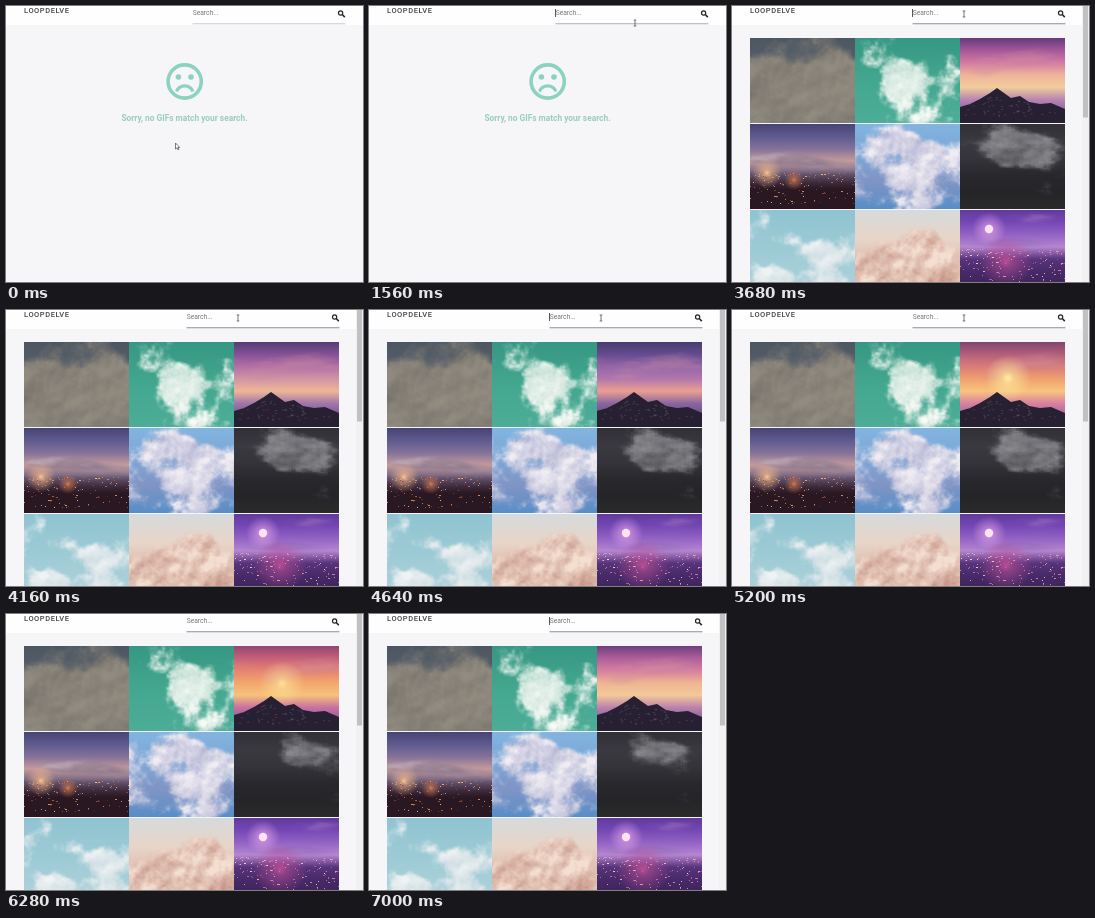
These frames come from a looping animation (357x276 px, 7040 ms). An HTML page with a canvas:

```html
<!DOCTYPE html>
<html lang="en">
<head>
<meta charset="utf-8">
<title>Clip search</title>
<style>
  html, body { margin: 0; width: 100%; height: 100%; overflow: hidden; background: #f6f5f8; }
  canvas, svg { position: absolute; left: 0; top: 0; width: 357px; height: 276px; }
  text { font-family: Roboto, sans-serif; white-space: pre; }
</style>
</head>
<body>
<canvas id="grid" width="357" height="276"></canvas>
<svg viewBox="0 0 357 276">
  <rect width="357" height="19" fill="#fefefe"/>
  <text x="18" y="6.8" font-size="7.5" font-weight="500" letter-spacing=".55" fill="#444">LOOPDELVE</text>
  <g id="bar">
    <text id="query" x="186.7" y="9" font-size="6.7"></text>
    <rect id="caret" x="186" y="3" width=".9" height="8" fill="#444"/>
    <rect id="underline" x="186.5" y="17" width="153" height="1.4"/>
    <g fill="none" stroke="#222" stroke-width="1.2">
      <circle cx="334.6" cy="7" r="2.1"/><path d="M336.2 8.5l2.6 2.6" stroke-width="1.5"/>
    </g>
  </g>
  <g id="empty">
    <g fill="none" stroke="#8bd2bf" stroke-width="3.6">
      <circle cx="178.7" cy="75.5" r="16.6"/>
      <path d="M170.5 85.5a8.8 8.8 0 0 1 16.4 0" stroke-width="3.2"/>
    </g>
    <g fill="#8bd2bf"><circle cx="172.4" cy="71" r="2.8"/><circle cx="185" cy="71" r="2.8"/></g>
    <text x="178.5" y="114.7" font-size="8.36" font-weight="700" text-anchor="middle" fill="#98cdbf">Sorry, no GIFs match your search.</text>
  </g>
  <g id="scroll">
    <rect x="350" width="7" height="276" fill="#f1f1f2"/>
    <rect x="351" width="5" height="111.5" fill="#c1c1c3"/>
  </g>
  <path id="arrow" d="M0 0v6l1.4-1.2 1 2 .9-.4-.9-1.9h1.8z" fill="#fff" stroke="#444" stroke-width=".7"/>
  <path id="beam" d="M-1.3-3H1.3M0-3V3M-1.3 3H1.3" fill="none" stroke="#555" stroke-width=".8"/>
</svg>
<script>
const LOOP = 7040, RESULTS = 3520, W = 105, H = 85, N = 256;
const el = id => document.getElementById(id);
const clamp = v => v < 0 ? 0 : v > 1 ? 1 : v;
const smooth = v => (v = clamp(v), v * v * (3 - 2 * v));
const mix = (a, b, k) => a + (b - a) * k;
const rgb = hex => [1, 3, 5].map(i => parseInt(hex.slice(i, i + 2), 16));
const palette = text => text.split(' ').map(rgb);

function randomizer(seed) {
  return () => (seed = (seed * 16807) % 2147483647) / 2147483647;
}

// Linear interpolation through rows of [time, ...values].
function track(rows, t) {
  const last = rows.length - 1;
  if (t <= rows[0][0]) return rows[0].slice(1);
  if (t >= rows[last][0]) return rows[last].slice(1);
  const i = rows.findIndex(row => row[0] > t), a = rows[i - 1], b = rows[i];
  return a.slice(1).map((v, j) => mix(v, b[j + 1], (t - a[0]) / (b[0] - a[0])));
}

// Tileable fractal noise, centred on zero.
const noise = new Float32Array(N * N);
for (let cells = 8, amp = 0.5; cells <= 128; cells *= 2, amp *= 0.56) {
  const random = randomizer(cells * 977 + 5);
  const lattice = Array.from({ length: cells * cells }, random);
  for (let y = 0; y < N; y++) for (let x = 0; x < N; x++) {
    const u = x * cells / N, v = y * cells / N, i = u | 0, j = v | 0;
    const i2 = (i + 1) % cells, j2 = (j + 1) % cells, k = smooth(u - i);
    const top = mix(lattice[j * cells + i], lattice[j * cells + i2], k);
    const low = mix(lattice[j2 * cells + i], lattice[j2 * cells + i2], k);
    noise[y * N + x] += amp * (mix(top, low, smooth(v - j)) - 0.5);
  }
}
const noiseAt = (x, y) => noise[(y & 255) * N + (x & 255)];

function gradient(colors, k) {
  const p = clamp(k) * (colors.length - 1), i = Math.min(p | 0, colors.length - 2);
  return colors[i].map((v, c) => mix(v, colors[i + 1][c], p - i));
}

function glow(g, x, y, r, color) {
  const fill = g.createRadialGradient(x, y, 0, x, y, r);
  fill.addColorStop(0, color);
  fill.addColorStop(0.25, color + '90');
  fill.addColorStop(1, color + '00');
  g.fillStyle = fill;
  g.fillRect(0, 0, W, H);
}

function cityLights(g, seed, count, top, depth, colors) {
  const random = randomizer(seed);
  for (let i = 0; i < count; i++) {
    const x = random() * W, y = top + depth * random() ** 1.4;
    g.globalAlpha = 0.4 + 0.6 * random();
    g.fillStyle = colors[i % colors.length];
    g.fillRect(x | 0, y | 0, random() < 0.25 ? 2 : 1, 1);
  }
  g.globalAlpha = 1;
}

const sunsets = [
  [3680, '#653d7e #a65898 #d37aa3 #efb39b #f2cd9c #b987b1 #8c62a4 #64477d'],
  [4640, '#493d70 #654c91 #9466a8 #b177ad #eb9f91 #8a679f #654d8c #4b3b6a'],
  [5200, '#82466f #b4607a #db7c77 #f0a06f #f8c47d #d981a0 #a763a0 #653f75'],
  [6280, '#944874 #c76178 #e78470 #f3a66c #f6c27b #c972a0 #985c98 #5e3d70'],
  [7000, '#70407f #b06099 #d77f9f #efb591 #f2c998 #bd83ac #8b609f #5d4277']
].map(([time, colors]) => [time, ...palette(colors).flat()]);

function sunsetSky(t) {
  const flat = track(sunsets, t);
  return Array.from({ length: 8 }, (_, i) => flat.slice(i * 3, i * 3 + 3));
}

function mountain(g, t) {
  const [sun] = track([[4700, 0], [5200, 1], [6280, 0.8], [6700, 0]], t);
  g.globalAlpha = sun;
  glow(g, 48, mix(42, 36, sun), 23, '#fff0a0');
  g.globalAlpha = 1;
  g.fillStyle = '#272032';
  g.beginPath();
  [[0, 69], [10, 66], [20, 61], [30, 55], [37, 50], [44, 55], [51, 60], [60, 58],
   [69, 64], [80, 66], [91, 65], [105, 71], [105, 85], [0, 85]].forEach(p => g.lineTo(...p));
  g.fill();
  g.fillStyle = '#80728e55';
  const random = randomizer(71);
  for (let i = 0; i < 90; i++) {
    const x = random() * W, y = 57 + random() * 21;
    if (y > 55 + Math.abs(x - 37) * 0.32) g.fillRect(x, y, 2, 1);
  }
}

function harbour(g) {
  const shade = g.createLinearGradient(0, 47, 0, 66);
  shade.addColorStop(0, '#2a172600');
  shade.addColorStop(1, '#291822');
  g.fillStyle = shade;
  g.fillRect(0, 45, W, 40);
  glow(g, 17, 49, 15, '#ffc18b');
  glow(g, 44, 56, 10, '#d87c50');
  cityLights(g, 37, 125, 49, 31, ['#e78b4e', '#f3b875', '#914a37']);
}

function moonCity(g) {
  glow(g, 29, 19, 17, '#eaa8ee');
  g.fillStyle = '#fce4f1';
  g.beginPath();
  g.arc(29, 19, 4.2, 0, 7);
  g.fill();
  glow(g, 46, 51, 27, '#b94e94');
  cityLights(g, 58, 150, 39, 34, ['#f39cab', '#e06fa4', '#ffd2b0']);
}

// Blobs are [x, y, radiusX, radiusY, weight].
const tiles = [
  { sky: '#4d5661 #58616a #68696a #7a756f', cloud: '#746f69 #969083', rough: 0.65, relief: 1.3,
    blobs: [[18, 37, 20, 25, .7], [49, 50, 30, 27, .65], [83, 33, 23, 31, .8], [50, 85, 105, 47, 1.1]], drift: [1.5, 0] },
  { sky: '#369783 #43a78f #4dad98', cloud: '#a3d0c2 #f8faf6', rough: 1.25, relief: 1.6,
    blobs: [[47, 31, 38, 23, .62], [79, 48, 30, 20, .5], [35, 53, 30, 13, .4], [101, 20, 18, 12, .28]], drift: [5, -1.5] },
  { sky: '#653d7e #f2cd9c', skyAt: sunsetSky, cloud: '#865491 #eda9a5', rough: .9, relief: .6, opacity: .35,
    blobs: [[70, 20, 55, 20, .35], [25, 35, 40, 11, .27]], drift: [7, 0], scale: [.45, 1.7], paint: mountain },
  { sky: '#494477 #605b8f #837299 #c59b9b #74637f #57445e #2a1d2d #241c26', cloud: '#66516e #c2aeb9', rough: .75, relief: 1,
    blobs: [[70, 39, 55, 12, .6], [24, 34, 38, 7, .5]], drift: [8, 0], scale: [.5, 1.5], opacity: .8, paint: harbour },
  { sky: '#83b4df #7aa6d7 #8094c5 #568ec6', cloud: '#a3a5cc #f0edf2', rough: 1.15, relief: 2,
    blobs: [[30, 18, 36, 19, .5], [73, 27, 36, 22, .55], [50, 53, 37, 19, .48], [18, 74, 32, 17, .35], [77, 80, 30, 15, .45]], drift: [4, 0] },
  { sky: '#303036 #39393f #35343a #28272b #252428 #2b2a2b', cloud: '#424248 #a4a4a8', rough: .8, relief: 1.4, opacity: .82,
    blobsAt: t => {
      const [wide, middle, right] = track([[3680, .62, .35, .4], [4640, .4, .55, .32], [5200, .35, .6, .34],
        [6280, .18, .22, .28], [6800, .1, .12, .65], [7000, .1, .12, .6]], t);
      return [[53, 27, 58, 19, wide], [50, 31, 25, 20, middle], [72, 18, 20, 13, right]];
    }, drift: [6, 0], scale: [.75, 1.3] },
  { sky: '#8fc4d1 #9ecbd5 #b2d3dc', cloud: '#b9d1da #f0f3f3', rough: 1.2, relief: 1.4,
    blobs: [[29, 29, 39, 16, .45], [74, 45, 42, 19, .5], [30, 69, 45, 19, .6], [80, 75, 35, 20, .4]], drift: [3, 0] },
  { sky: '#d6dadb #e8d5c9 #dcb7a7 #d3ac9e', cloud: '#b98476 #f4ded0', rough: .9, relief: 2,
    blobs: [[45, 46, 38, 21, .65], [75, 32, 28, 21, .5], [20, 61, 31, 22, .55], [80, 72, 35, 17, .55]], drift: [2.5, 0] },
  { sky: '#623a9d #7548b5 #9364c4 #b586d0 #57347c #472a69 #3e255c #332047', cloud: '#6044a0 #bd8bd3', rough: .7, relief: .8, opacity: .55,
    blobs: [[55, 32, 70, 8, .65], [75, 10, 30, 13, .3]], drift: [4, 0], scale: [.5, 1.7], paint: moonCity }
];
tiles.forEach(tile => {
  tile.sky = palette(tile.sky);
  tile.cloud = palette(tile.cloud);
});

const sheet = el('grid').getContext('2d');
const tileCanvas = document.createElement('canvas');
tileCanvas.width = W;
tileCanvas.height = H;
const brush = tileCanvas.getContext('2d', { willReadFrequently: true });
const image = brush.createImageData(W, H);

function drawTile(tile, index, t) {
  const { rough, relief, drift, scale = [1, 1], opacity = 1, cloud: [dark, light] } = tile;
  const sky = tile.skyAt ? tile.skyAt(t) : tile.sky;
  const blobs = tile.blobsAt ? tile.blobsAt(t) : tile.blobs;
  const seconds = ((t - RESULTS + 3160) % 3320) / 1000;
  const dx = drift[0] * seconds, dy = drift[1] * seconds;
  for (let y = 0, p = 0; y < H; y++) {
    const base = gradient(sky, y / H);
    for (let x = 0; x < W; x++, p += 4) {
      const nx = (x - dx) * scale[0] + index * 83 + 256, ny = (y - dy) * scale[1] + index * 47;
      const n = noiseAt(nx, ny);
      let density = rough * n;
      for (const [bx, by, rx, ry, weight] of blobs) {
        const u = (x - dx - bx) / rx, v = (y - dy - by) / ry, d = 1 + u * u + v * v;
        density += weight / (d * d);
      }
      const cover = opacity * smooth((density - 0.2) / 0.3);
      const lit = clamp(0.62 + relief * (n - noiseAt(nx - 3, ny - 6)) + 0.4 * n);
      for (let c = 0; c < 3; c++) image.data[p + c] = mix(base[c], mix(dark[c], light[c], lit), cover);
      image.data[p + 3] = 255;
    }
  }
  brush.putImageData(image, 0, 0);
  if (tile.paint) tile.paint(brush, t);
  sheet.drawImage(tileCanvas, 18 + index % 3 * 105, 32 + (index / 3 | 0) * 86);
}

const pointer = [[80, 169.5, 137], [760, 231, 62], [1400, 266, 17], [1560, 266, 17], [1800, 232, 8],
  [5700, 232, 8], [5900, 297, 2], [6050, 362, -8]];
const keyTimes = [2360, 2800, 2960, 3040, 3160, 3360];
const show = (id, on) => el(id).setAttribute('visibility', on ? 'visible' : 'hidden');

function drawPage(t) {
  const found = t >= RESULTS, typing = !found && t >= keyTimes[0];
  const typed = typing ? 'clouds'.slice(0, keyTimes.filter(time => t >= time).length) : '';
  const query = el('query');
  query.textContent = typed || 'Search...';
  query.setAttribute('fill', typed ? '#444' : '#77777b');
  el('caret').setAttribute('x', 186 + (typed ? query.getComputedTextLength() + 0.6 : 0));
  show('caret', typing || (found ? (t - RESULTS) % 1000 < 500 : t >= 1520 && (t - 1560) % 1000 < 520));
  el('bar').setAttribute('transform', `translate(${found ? -6 : 0} 0)`);
  el('underline').setAttribute('fill', found ? '#aaaaac' : t < 1520 ? '#d8d7da' : '#c2c1c4');
  show('empty', !found);
  show('scroll', found);
  const [x, y] = track(pointer, t), overInput = y < 19;
  for (const id of ['arrow', 'beam']) {
    el(id).setAttribute('transform', `translate(${x} ${y})`);
    show(id, (id === 'beam') === overInput);
  }
  sheet.clearRect(0, 0, 357, 276);
  if (found) tiles.forEach((tile, i) => drawTile(tile, i, t));
}

let shown = -1;
function frame() {
  const t = Math.floor(performance.now() % LOOP / 40) * 40;
  if (t !== shown) drawPage(shown = t);
  requestAnimationFrame(frame);
}
frame();
</script>
</body>
</html>
```
